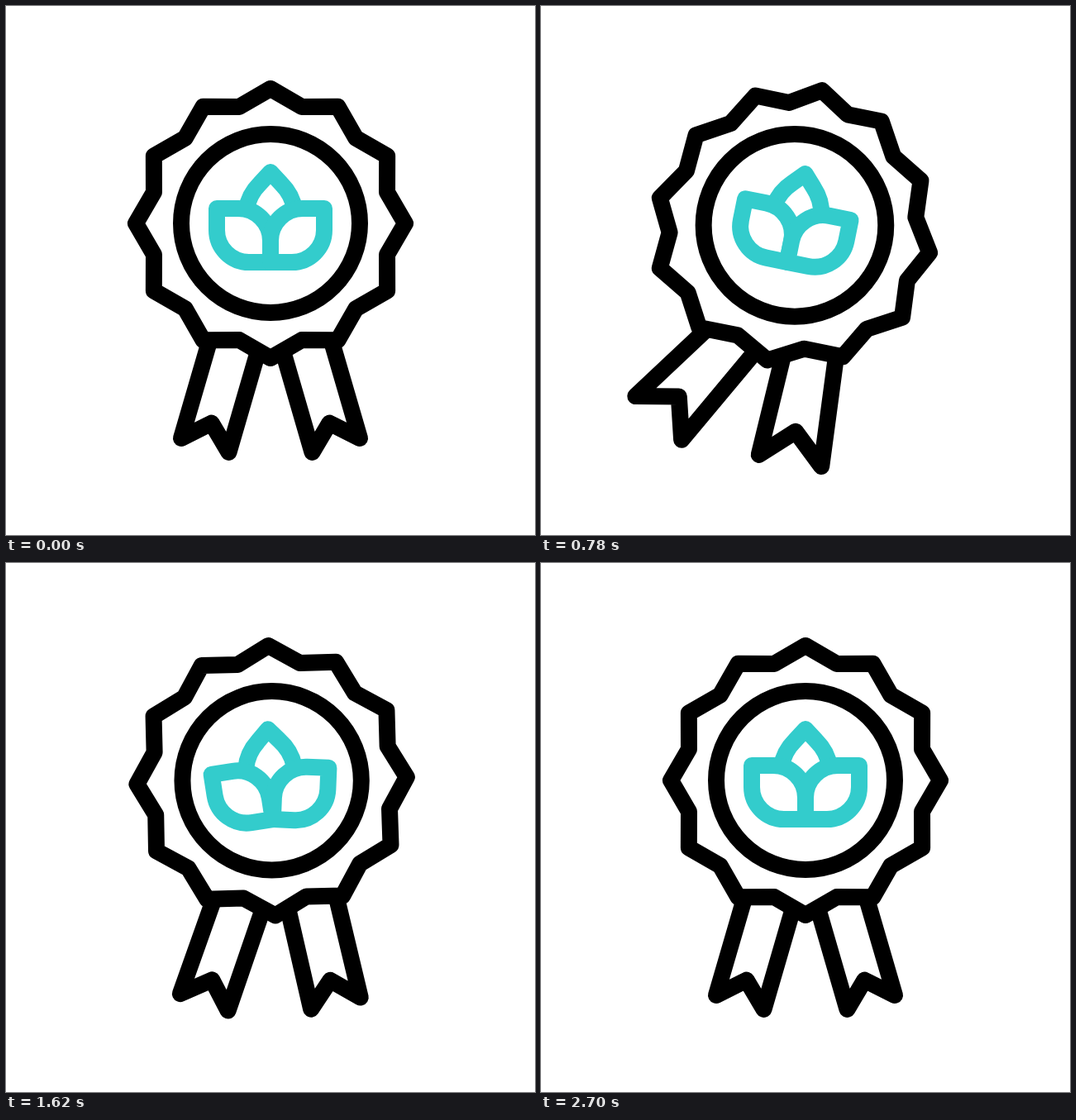
Recreate the animation shown at these times as an HTML page with a canvas. Size 640 px wide and 640 px high, loop 3600 ms.

```html
<!DOCTYPE html>
<html lang="en">
<head>
<meta charset="utf-8">
<title>Award rosette</title>
<style>
  html, body { margin: 0; width: 100%; height: 100%; overflow: hidden; background: #fff; }
  canvas { display: block; width: 100vmin; height: 100vmin; }
</style>
</head>
<body>
<canvas id="stage" width="640" height="640"></canvas>
<script>
const ctx = document.getElementById('stage').getContext('2d');
const LOOP = 3600;
const BLACK = '#000';
const TEAL = '#33cccc';
const RAD = Math.PI / 180;

const CX = 320, CY = 263;      // medal centre
const PIVOT_Y = 201;           // the medal swings around this height
const GROW_Y = 93;             // and grows away from this one
const LEAF_Y = 310;            // foot shared by the leaves

// Eases between [time, value] turning points
function ease(keys, t) {
  const next = keys.findIndex(key => key[0] > t);
  if (next === 0) return keys[0][1];
  if (next < 0) return keys[keys.length - 1][1];
  const [t0, v0] = keys[next - 1];
  const [t1, v1] = keys[next];
  const u = (t - t0) / (t1 - t0);
  return v0 + (v1 - v0) * u * u * (3 - 2 * u);
}

const medalTurn = t => ease([[160, 0], [740, 11.9], [1220, -9.1], [1760, 0]], t);
const stretchAt = t => ease([[160, 0], [900, 1], [1760, 0]], t);
const leafTurn = (t, first, second) =>
  ease([[900, 0], [1360, first], [1980, second], [2700, 0]], t);

// The ribbons trail behind the medal, then swing out
function ribbonTurn(t) {
  const from = 1740, to = 2700, peak = 6;
  if (t < from) return ease([[160, 0], [400, -9.5], [790, 27], [1220, -16], [from, peak]], t);
  const fade = Math.max(0, (to - t) / (to - from));
  return peak * fade ** 1.4 * Math.cos(Math.PI * (t - from) / 260);
}

function rotate(x, y, angle) {
  const c = Math.cos(angle), s = Math.sin(angle);
  return [x * c - y * s, x * s + y * c];
}

function turnAround(x, y, angle) {
  ctx.translate(x, y);
  ctx.rotate(angle);
  ctx.translate(-x, -y);
}

function tracePath(points) {
  ctx.beginPath();
  points.forEach(p => ctx.lineTo(...p));
}

// Stretching enlarges the medal and widens its lower half
function medalPoint(x, y, pose) {
  const widen = 1 + pose.stretch * 0.0005 * (y - CY);
  const [dx, dy] = rotate(
    (x - CX) * pose.scale * widen,
    GROW_Y + (y - GROW_Y) * pose.scale - PIVOT_Y,
    pose.angle
  );
  return [CX + dx, PIVOT_Y + dy];
}

function drawRibbon(side, pose) {
  const [x, y] = medalPoint(CX + side * 45, 415, pose);
  const angle = pose.ribbon - side * 16.4 * RAD;
  const width = 1 + 0.3 * pose.stretch;
  const length = 121.4 * (1 + 0.03 * pose.stretch);
  const hang = (across, down) => {
    const [dx, dy] = rotate(side * across * width, down, angle);
    return [x + dx, y + dy];
  };
  tracePath([
    medalPoint(CX + side * 74, 406, pose),
    hang(30, length),
    hang(0, length - 28 * width),
    hang(-30, length),
    medalPoint(CX + side * 16, 421, pose)
  ]);
  ctx.stroke();
}

function drawMedal(pose) {
  tracePath(Array.from({ length: 24 }, (_, i) => {
    const [dx, dy] = rotate(0, i % 2 ? -146 : -163, i * 15 * RAD);
    return medalPoint(CX + dx, CY + dy, pose);
  }));
  ctx.closePath();
  ctx.fill();
  ctx.stroke();
  ctx.beginPath();
  ctx.arc(...medalPoint(CX, CY, pose), 108 * pose.scale, 0, 2 * Math.PI);
  ctx.stroke();
}

function drawPetal(turn) {
  ctx.save();
  turnAround(CX, LEAF_Y, turn * RAD);
  ctx.beginPath();
  ctx.moveTo(291, 246);
  ctx.bezierCurveTo(293, 232, 300, 222, 307, 215);
  ctx.lineTo(320, 201);
  ctx.lineTo(333, 215);
  ctx.bezierCurveTo(340, 222, 347, 232, 349, 246);
  ctx.stroke();
  ctx.restore();
}

function drawLeaf(side, turn) {
  ctx.save();
  ctx.translate(CX, LEAF_Y);
  ctx.rotate(turn * RAD);
  ctx.scale(side, 1);
  ctx.beginPath();
  ctx.moveTo(65, -65);
  ctx.arcTo(0, -65, 0, 0, 39);
  ctx.lineTo(0, 0);
  ctx.arcTo(65, 0, 65, -65, 39);
  ctx.closePath();
  ctx.fill();
  ctx.stroke();
  ctx.restore();
}

function drawFlower(t, pose) {
  ctx.save();
  turnAround(CX, PIVOT_Y, pose.angle);
  ctx.translate(0, 2.2 * pose.stretch);
  drawPetal(leafTurn(t, -7, 7));
  drawLeaf(-1, leafTurn(t, -10, -3));
  drawLeaf(1, leafTurn(t, -5, 18));
  ctx.restore();
}

function draw(t) {
  const stretch = stretchAt(t);
  const pose = {
    stretch,
    scale: 1 + 0.023 * stretch,
    angle: medalTurn(t) * RAD,
    ribbon: ribbonTurn(t) * RAD
  };
  ctx.fillStyle = '#fff';
  ctx.fillRect(0, 0, 640, 640);
  ctx.lineWidth = 20;
  ctx.lineJoin = 'round';
  ctx.strokeStyle = BLACK;
  drawRibbon(-1, pose);
  drawRibbon(1, pose);
  drawMedal(pose);
  ctx.strokeStyle = TEAL;
  drawFlower(t, pose);
}

const start = performance.now();
function tick() {
  draw((performance.now() - start) % LOOP);
  requestAnimationFrame(tick);
}
tick();
</script>
</body>
</html>
```
